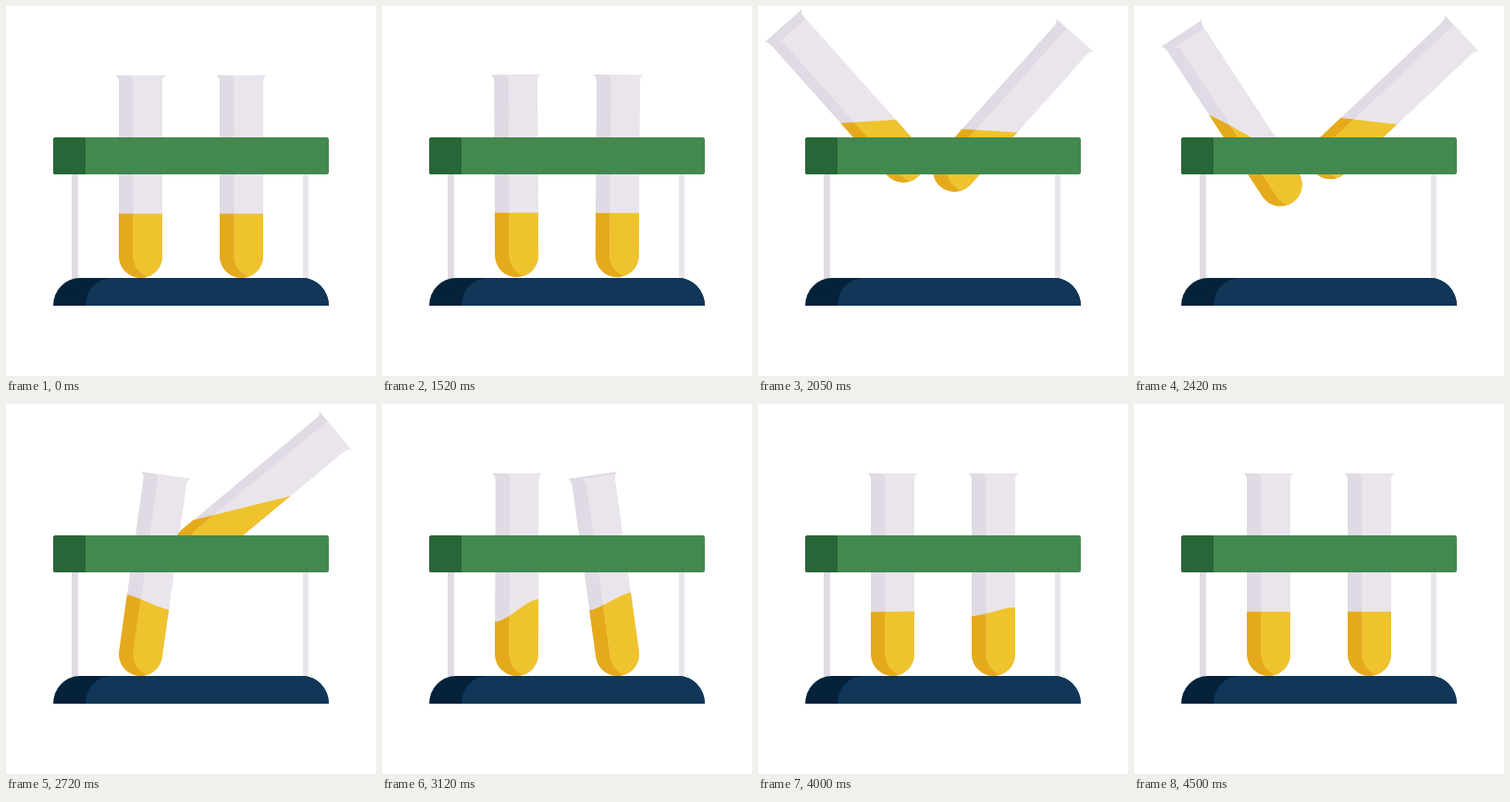
Recreate the animation shown at these times as an HTML page. Size 400 by 400 pixels, loop 4520 ms.

```html
<!DOCTYPE html>
<html lang="en">
<head>
<meta charset="utf-8">
<title>Test tubes</title>
<style>
  html, body { margin: 0; width: 100%; height: 100%; overflow: hidden; background: #fff; }
  svg { display: block; width: 100vw; height: 100vh; }
  .glass { fill: #eae5ec; }
  .glass-shade { fill: #dfdae3; }
  .liquid { fill: #efc32e; }
  .liquid-shade { fill: #e5aa1c; }
</style>
</head>
<body>
<svg viewBox="0 0 400 400">
  <defs>
    <!-- tube outline, origin at the centre of its round end -->
    <path id="outline" d="M-27.5-195.5H27.5C25-194 23.5-192 23.5-188V0A23.5 23.5 0 0 1-23.5 0V-188C-23.5-192-25-194-27.5-195.5Z"/>
    <clipPath id="inside"><use href="#outline"/></clipPath>
    <clipPath id="bar"><rect x="51" y="142" width="298" height="40" rx="2.5"/></clipPath>
    <clipPath id="foot"><path d="M51 324A29 30 0 0 1 80 294H320A29 30 0 0 1 349 324Z"/></clipPath>
  </defs>

  <rect x="71" y="180" width="7" height="116" fill="#dfdae3"/>
  <rect x="321" y="180" width="6" height="116" fill="#eae5ec"/>

  <g id="tubes"></g>

  <g clip-path="url(#bar)">
    <rect x="51" y="142" width="298" height="40" fill="#43884f"/>
    <rect x="51" y="142" width="35" height="40" fill="#276637"/>
  </g>
  <g clip-path="url(#foot)">
    <rect x="51" y="294" width="298" height="30" fill="#06223b"/>
    <path d="M86 324A28 30 0 0 1 114 294H349V324Z" fill="#103658"/>
  </g>
</svg>

<script>
const LOOP = 4520, START = 1490, RISE = 545;
const LIGHT = 15.5;

// side mirrors the motion; drop is when the tube starts to fall back
const tubes = [
  { x: 145.5, side: 1, inward: 11.5, lift: 102.5, drop: 2290 },
  { x: 254.5, side: -1, inward: 42, lift: 92.5, drop: 2710 }
];

const clamp = u => Math.min(1, Math.max(0, u));
const mix = (a, b, u) => a + (b - a) * u;
const ease = (time, duration) => (1 - Math.cos(Math.PI * clamp(time / duration))) / 2;

// Rise, slow drift with a late tug, fall past upright, settle.
function pose({ inward, lift, drop }, t) {
  const up = ease(t - START, RISE);
  const top = START + RISE;
  const drift = clamp((t - top) / (drop - top)) * (drop - top);
  const tug = clamp((t - top) / (drop - top)) ** 6;
  const since = t - drop;
  const aloft = 1 - ease(since, 350);
  const swing = mix(-41.5 * up - .0133 * drift, 8, ease(since, 420));
  return {
    dx: (inward * up + 7 * tug) * aloft,
    dy: -(lift * up + .037 * drift) * aloft,
    angle: swing * (1 - ease(since - 420, 450)),
    ...surface(up, tug, since)
  };
}

// The liquid leans while aloft, then sloshes with a fading sine.
function surface(up, tug, since) {
  const landed = ease(since, 540);
  const s = Math.max(0, since - 540);
  const slosh = 20 * clamp(1 - s / 1250) ** 1.5 * Math.sin(2 * Math.PI * s / 930);
  return {
    slope: (19 * up + 31 * tug) * (1 - landed) - slosh,
    level: -46 - (11 * up + 7 * tug) * (1 - ease(since, 1000)),
    straight: mix(.33, .05, landed)
  };
}

function liquidPath(slope, level, straight) {
  const left = level - slope, right = level + slope, bend = 2 * slope * straight;
  return `M-24 ${left}C-8 ${left + bend} 8 ${right - bend} 24 ${right}V30H-24Z`;
}

const layer = document.getElementById("tubes");
for (const tube of tubes) {
  const node = document.createElementNS("http://www.w3.org/2000/svg", "g");
  node.innerHTML = `<g clip-path="url(#inside)">
    <use href="#outline" class="glass-shade"/>
    <path class="liquid-shade"/>
    <g class="lit" clip-path="url(#inside)">
      <use href="#outline" class="glass"/>
      <path class="liquid"/>
    </g>
  </g>`;
  tube.node = node;
  tube.lit = node.querySelector(".lit");
  tube.fills = node.querySelectorAll("path");
  layer.append(node);
}

function draw() {
  const t = performance.now() % LOOP;
  for (const tube of tubes) {
    const { x, side, node, lit, fills } = tube;
    const { dx, dy, angle, slope, level, straight } = pose(tube, t);
    const turn = side * angle;
    node.setAttribute("transform",
      `translate(${x + side * dx} ${270.5 + dy}) rotate(${turn})`);

    // The lit part is always shifted straight to the right on the stage.
    const rad = turn * Math.PI / 180;
    const lx = LIGHT * Math.cos(rad), ly = -LIGHT * Math.sin(rad);
    lit.setAttribute("transform", `translate(${lx} ${ly})`);
    fills[1].setAttribute("transform", `translate(${-lx} ${-ly})`);

    const d = liquidPath(side * slope, level, straight);
    fills.forEach(path => path.setAttribute("d", d));
  }
  requestAnimationFrame(draw);
}
draw();
</script>
</body>
</html>
```
